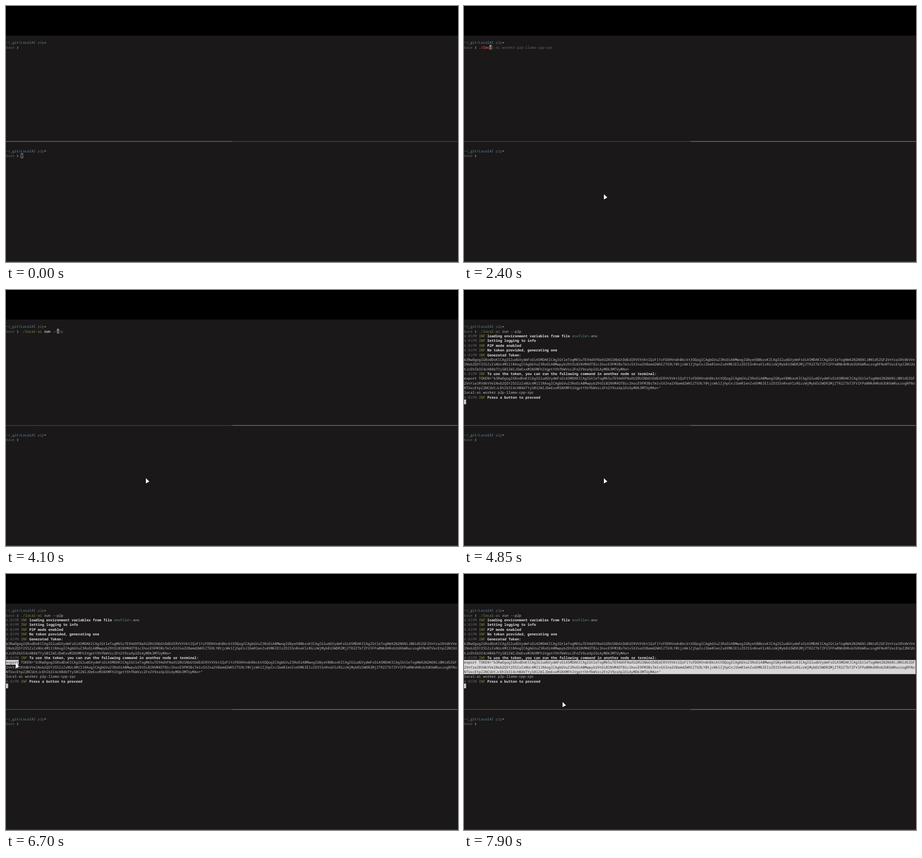
An HTML page for the animation above (8 s loop, 995 by 563 pixels).

```html
<!DOCTYPE html>
<html lang="en">
<head>
<meta charset="utf-8">
<title>Terminal session</title>
<style>
  html, body { margin: 0; width: 100%; height: 100%; overflow: hidden; background: #1a1819; }
  svg { display: block; width: 995px; height: 563px; }
  text {
    font: 7.778px "Noto Sans Mono", "DejaVu Sans Mono", monospace;
    white-space: pre; text-rendering: geometricPrecision; fill: #c0bebf;
  }
  .path { fill: #658ba5; }
  .dim { fill: #686667; }
  .star { fill: #c8c6c7; }
  .arrow { fill: #a29598; font-family: "DejaVu Sans Mono", "DejaVu Sans", monospace; }
  .bad { fill: #d2584f; font-weight: 700; }
  .ok { fill: #8e8e52; }
  .inf { fill: #8f9a48; }
  .msg { fill: #e0dedf; font-weight: 700; }
  .run { fill: #c8c6c7; font-weight: 600; }
  .key { fill: #5f8b98; }
  .dark { fill: #2b292a; }
</style>
</head>
<body>
<svg viewBox="0 0 995 563" xmlns="http://www.w3.org/2000/svg">
  <rect width="995" height="563" fill="#1a1819"/>
  <rect width="995" height="65" fill="#000"/>
  <rect id="left" y="297.4" width="498.5" height="1"/>
  <rect id="right" x="498.5" y="297.4" width="495.5" height="1"/>
  <rect y="562" width="995" height="1" fill="#5a5249"/>
  <g id="screen"></g>
  <path id="mouse" d="M0 0L7.5 7.2L0 11.2Z" fill="#fff"/>
</svg>
<script>
const LOOP = 8000, STEP = 50, CW = 4.667, RH = 10.37, COLS = 213, TOP = 75, LOW = 313.6;
const $ = id => document.getElementById(id);
const esc = s => s.replace(/&/g, "&amp;").replace(/</g, "&lt;");

const text = (row, col, str, cls = "", top = TOP) =>
  `<text x="${(col * CW).toFixed(2)}" y="${(top + row * RH + 8.3).toFixed(2)}" class="${cls}">${esc(str)}</text>`;
const block = (row, col, cols, rows, fill, top = TOP) =>
  `<rect x="${col * CW}" y="${top + row * RH}" width="${cols * CW}" height="${rows * RH}" fill="${fill}"/>`;

// The asterisk hangs a little lower than the font sets it.
const prompt = top =>
  text(0, 0, "~/_git/LocalAI", "path", top) + text(0, 15, "p2p", "dim", top) +
  text(0.13, 18, "*", "star", top) + text(1, 0, "base", "dim", top) + text(1, 5, "❯", "arrow", top);

// The token is the base64 form of the network settings.
const otp = (name, key) => `  ${name}:\n    interval: 900\n    key: ${key}\n    length: 43\n`;
const token = btoa("otp:\n" +
  otp("dht", "2NnLOxuqMiu6EIMlkCtGHEUWVKeC1uc1C8ugvpdrKW9") +
  otp("crypto", "5n67cz7Rt7WydavVv3kTUvEUzSqod9cnyg6q5G83YuD") +
  "room: e5S890brXhpOE3plNmoIvgkeAjgvXyYLoKcKcqi5f8i\n" +
  "rendezvous: B3d29JtgiYsDbsZ32lE7X4v26SGfSm6EVQOkCJtthou\n" +
  "mdns: DSh551pKigcBQKIpHHor8ppxm62KIYZRCxLq2SW0XeV\n" +
  "max_message_size: 20971520\n");

const wrap = (row, str, cls) => {
  let out = "";
  for (let i = 0; i < str.length; i += COLS) out += text(row++, 0, str.slice(i, i + COLS), cls);
  return out;
};
const log = (row, msg) =>
  text(row, 0, "4:01PM", "dim") + text(row, 7, "INF", "inf") + text(row, 11, msg, "msg");

const exportLine = `export TOKEN="${token}"`;
const BRIGHT = "#d9d7d8", CURSOR = "#c8c6c7";

function output(t) {
  let s = log(2, "loading environment variables from file") +
    text(2, 51, "envFile=", "key") + text(2, 59, ".env") + log(3, "Setting logging to info");
  if (t < 4850) return s + block(4, 0, 1, 1, CURSOR);
  s += log(4, "P2P mode enabled") + log(5, "No token provided, generating one") +
    log(6, "Generated Token:") + wrap(7, token) +
    log(10, "To use the token, you can run the following command in another node or terminal:");
  if (t >= 6850) s += block(11, 0, COLS, 3, BRIGHT) + wrap(11, exportLine, "dark");
  else {
    s += wrap(11, exportLine);
    if (t >= 6700) s += block(11, 0, 6, 1, BRIGHT) + text(11, 0, "export", "dark");
  }
  return s + text(14, 0, "local-ai worker p2p-llama-cpp-rpc") +
    log(15, "Press a button to proceed") + block(16, 0, 1, 1, CURSOR);
}

// Moment at which each further character has been typed.
const keys = [1900, 2100, 2150, 2300, 2400, 2450, 2500, 2600, 2800, 2850, 3000,
  3200, 3250, 3350, 3400, 3600, 4100, 4300, 4450, 4600];
const command = "./local-ai run --p2p", older = "./local-ai worker p2p-llama-cpp-rpc";

function commandLine(t) {
  const n = keys.filter(k => k <= t).length;
  const done = t >= 4800;
  const typed = command.slice(0, n);
  let s = text(1, 7, typed.slice(0, 10), n < 10 ? "bad" : "ok");
  s += text(1, 18, typed.slice(11, 14), done ? "" : "run") + text(1, 22, typed.slice(15));
  if (done || t < 950) return s;
  const rest = n ? (n < 12 ? older : command).slice(n) : "";
  s += block(1, 7 + n, 1, 1, rest.trim() ? "#858384" : CURSOR);
  return s + text(1, 7 + n, rest.slice(0, 1), "dark") + text(1, 8 + n, rest.slice(1), "dim");
}

function lowCursor(t) {
  if (t >= 950) return "";
  if (t >= 300) return block(1, 7, 1, 1, CURSOR, LOW);
  return `<rect x="33" y="324.5" width="4" height="9.5" fill="none" stroke="#a8a6a7"/>`;
}

const route = [[300, 308, 414], [5450, 308, 414], [5750, 25, 296.5], [6250, 27, 197],
  [6400, 27, 197], [6500, 21.5, 196], [7550, 21.5, 196], [7750, 112, 322], [7900, 217, 281.5]];

function mouseAt(t) {
  const i = route.findIndex(p => p[0] > t);
  if (i < 0) return route[route.length - 1].slice(1);
  const [a, b] = [route[i - 1], route[i]];
  const u = (t - a[0]) / (b[0] - a[0]), e = u * u * (3 - 2 * u);
  return [1, 2].map(k => a[k] + (b[k] - a[k]) * e);
}

let last = -1;
function draw(now) {
  const t = Math.floor((now % LOOP) / STEP) * STEP;
  if (t === last) return;
  last = t;
  const upper = t >= 950;
  $("left").setAttribute("fill", !upper ? "#93918f" : t < 4150 ? "#5c5b36" : "#68665b");
  $("right").setAttribute("fill", upper ? "#a09e9c" : "#605f45");
  $("screen").innerHTML = prompt(TOP) + prompt(LOW) + commandLine(t) +
    (t >= 4800 ? output(t) : "") + lowCursor(t);
  const shown = t >= 300;
  $("mouse").setAttribute("visibility", shown ? "visible" : "hidden");
  if (shown) $("mouse").setAttribute("transform", `translate(${mouseAt(t)})`);
}

const start = performance.now();
function tick() {
  draw(performance.now() - start);
  requestAnimationFrame(tick);
}
tick();
</script>
</body>
</html>
```
